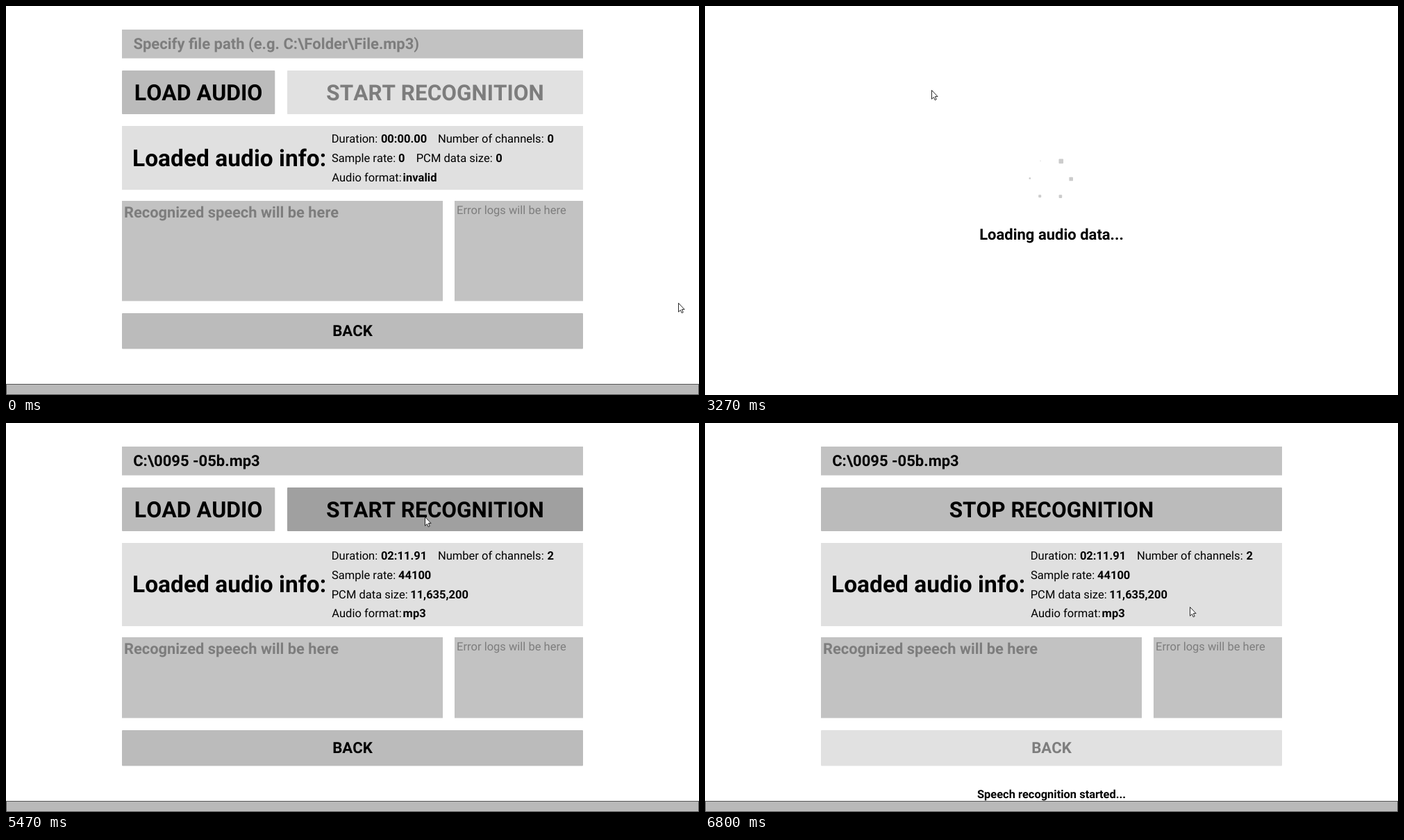
An HTML page for the animation above (8000 ms loop, 998 by 561 pixels).

```html
<!DOCTYPE html>
<html lang="en">
<head>
<meta charset="utf-8">
<title>Speech recognition demo</title>
<style>
  html, body { margin: 0; width: 100%; height: 100%; overflow: hidden; background: #fff; }
  svg { display: block; width: 998px; height: 561px; }
  text { font-family: Roboto, sans-serif; font-kerning: none; white-space: pre; text-rendering: geometricPrecision; }
</style>
</head>
<body>
<svg id="stage" viewBox="0 0 998 561"></svg>
<script>
const LOOP = 8000;
const NORMAL = '#bbbbbb', HOVER = '#dedede', PRESSED = '#a0a0a0', DISABLED = '#e1e1e1';
const FIELD = '#c2c2c2', MUTED = '#7d7d7d';
const stage = document.getElementById('stage');

function add(parent, tag, attrs, content) {
  const el = document.createElementNS('http://www.w3.org/2000/svg', tag);
  set(el, attrs);
  if (content) el.textContent = content;
  parent.append(el);
  return el;
}
function set(el, attrs) {
  for (const name in attrs) el.setAttribute(name, attrs[name]);
}
const show = (el, on) => { el.style.display = on ? '' : 'none'; };
const group = parent => add(parent, 'g', {});
const box = (parent, x, y, width, height, fill, rx = 0) =>
  add(parent, 'rect', { x, y, width, height, fill, rx });
const label = (parent, x, y, size, content, { bold = true, fill = '#000', anchor = 'start' } = {}) =>
  add(parent, 'text', {
    x, y, fill, 'font-size': size, 'font-weight': bold ? 700 : 400, 'text-anchor': anchor
  }, content);

function button(parent, x, y, w, h, size, baseline, content) {
  const g = group(parent);
  const face = box(g, x, y, w, h, NORMAL, 1);
  const caption = label(g, x + w / 2, baseline, size, content, { anchor: 'middle' });
  return {
    g,
    contains: p => p.x >= x && p.x < x + w && p.y >= y && p.y < y + h,
    paint(fill) {
      set(face, { fill });
      set(caption, { fill: fill === DISABLED ? MUTED : '#000' });
    }
  };
}

// Main screen
const main = group(stage);
box(main, 167, 34, 664, 41.5, FIELD);
const hint = label(main, 183.4, 62, 22, 'Specify file path (e.g. C:\\Folder\\File.mp3)', { fill: MUTED });
const path = label(main, 183.2, 62, 22, 'C:\\0095 -05b.mp3');
const caret = box(main, 0, 41, 1, 26, '#000');

const load = button(main, 167, 93, 220.3, 63, 32, 136, 'LOAD AUDIO');
const start = button(main, 405, 93, 426, 63, 31.5, 136, 'START RECOGNITION');
const stop = button(main, 167, 93, 664, 63, 31.5, 136, 'STOP RECOGNITION');

const infoBox = box(main, 167, 173, 664, 92, '#e0e0e0');
const infoTitle = label(main, 182, 231, 33.5, 'Loaded audio info:');

function infoLines(rows) {
  const g = group(main);
  for (const [x, y, name, valueX, value] of rows) {
    label(g, x, y, 16.55, name, { bold: false });
    label(g, valueX, y, 16.5, value);
  }
  return g;
}
const emptyInfo = infoLines([
  [468.7, 196.5, 'Duration:', 539.9, '00:00.00'],
  [621.9, 196.5, 'Number of channels:', 779.4, '0'],
  [468.9, 224.5, 'Sample rate:', 564.9, '0'],
  [590.7, 224.5, 'PCM data size:', 705.2, '0'],
  [469.2, 252.5, 'Audio format:', 571.6, 'invalid']
]);
const fullInfo = infoLines([
  [468.7, 196.5, 'Duration:', 539.9, '02:11.91'],
  [621.9, 196.5, 'Number of channels:', 779.4, '2'],
  [468.9, 224.5, 'Sample rate:', 565, '44100'],
  [468.7, 252.5, 'PCM data size:', 582.2, '11,635,200'],
  [469.2, 280, 'Audio format:', 571.6, 'mp3']
]);

const speechBox = box(main, 167, 281, 462, 144.5, FIELD);
const logBox = box(main, 646, 281, 185, 144.5, FIELD);
const speechHint = label(main, 170, 304.8, 21.85, 'Recognized speech will be here', { fill: MUTED });
const logHint = label(main, 649, 300.2, 16.5, 'Error logs will be here', { bold: false, fill: MUTED });
const back = button(main, 167, 443, 664, 51.5, 22.2, 476, 'BACK');
const status = label(main, 499, 541, 16.45, 'Speech recognition started...', { anchor: 'middle' });
set(box(main, 0.5, 545.5, 997, 15, '#b9b9b9'), { stroke: '#555' });

// Loading screen
const loading = group(stage);
const message = label(loading, 499, 337.3, 22, '', { anchor: 'middle' });
const dots = [6.6, 5.6, 4.6, 4, 2.6, 1.1].map(size => ({ size, el: box(loading, 0, 0, size, size, '#cccccc', 0.9) }));

function spin(elapsed) {
  dots.forEach(({ size, el }, i) => {
    const angle = (i * 60 - 59 - elapsed * 0.06) * Math.PI / 180;
    set(el, {
      x: 497.5 + 29.7 * Math.cos(angle) - size / 2,
      y: 249 + 29.3 * Math.sin(angle) - size / 2
    });
  });
}

// Pointer
const pointer = group(stage);
const arrow = add(pointer, 'path', {
  d: 'M.5 .5V13.2L3.4 10.5L5.2 14.7L7.2 13.8L5.4 9.6H9.1Z',
  fill: '#fff', stroke: '#111', 'stroke-width': 0.9
});
const beam = add(pointer, 'path', {
  d: 'M0 .5H2.5M3.5 .5H6M3 1V12M0 12.5H2.5M3.5 12.5H6', fill: 'none', stroke: '#111'
});

// Each move: first step, last step, number of steps, destination
const moves = [
  [130, 200, 2, 960, 412],
  [470, 930, 8, 635, 54],
  [1470, 1800, 6, 405, 54],
  [2270, 2470, 4, 324, 98],
  [2530, 2800, 5, 326, 121],
  [4000, 4000, 1, 327, 121],
  [4067, 4600, 9, 614, 204],
  [4870, 5130, 5, 603, 135],
  [6200, 6800, 10, 698, 265]
];
function pointerAt(t) {
  let x = 968, y = 428;
  for (const [first, last, count, toX, toY] of moves) {
    if (t < first) break;
    const gap = (last - first) / (count - 1) || 1;
    const p = Math.min(count, Math.floor((t - first + 2) / gap) + 1) / count;
    const eased = p * p * (3 - 2 * p);
    x += (toX - x) * eased;
    y += (toY - y) * eased;
  }
  return { x: Math.round(x), y: Math.round(y) };
}

const within = (t, from, to) => t >= from && t < to;

function render(t) {
  const p = pointerAt(t);
  const loadingAudio = within(t, 3270, 3470);
  const initiating = within(t, 5530, 5670);
  const busy = loadingAudio || initiating;
  const loaded = t >= 3470, running = t >= 5670, pasted = t >= 1470;
  const shift = loaded ? 28 : 0;

  show(main, !busy);
  show(loading, busy);
  if (busy) {
    message.textContent = loadingAudio ? 'Loading audio data...' : 'Initiating speech recognizer...';
    spin(loadingAudio ? t - 3270 : t - 5530 + 20);
  }

  show(hint, !pasted);
  show(path, pasted);
  show(caret, within(t, 1130, 1330) || within(t, 1470, 2070) || within(t, 2730, 3070));
  set(caret, { x: pasted ? 366 : 184.5 });

  const face = (b, pressed) => pressed ? PRESSED : b.contains(p) ? HOVER : NORMAL;
  load.paint(face(load, within(t, 3070, 3130)));
  start.paint(loaded ? face(start, within(t, 5470, 5530)) : DISABLED);
  stop.paint(face(stop, false));
  back.paint(running ? DISABLED : NORMAL);
  show(load.g, !running);
  show(start.g, !running);
  show(stop.g, running);
  show(status, running);

  show(emptyInfo, !loaded);
  show(fullInfo, loaded);
  set(infoBox, { height: 92 + shift });
  set(infoTitle, { y: loaded ? 244 : 231 });
  for (const el of [speechBox, logBox]) set(el, { y: 281 + shift, height: 144.5 - shift });
  set(speechHint, { y: 304.8 + shift });
  set(logHint, { y: 300.2 + shift });

  const overField = !busy && within(p.x, 167, 831) && within(p.y, 28, 70);
  show(beam, overField);
  show(arrow, !overField);
  set(pointer, { transform: `translate(${p.x} ${p.y})` });
}

const origin = performance.now();
function tick() {
  render((performance.now() - origin) % LOOP);
  requestAnimationFrame(tick);
}
tick();
</script>
</body>
</html>
```
